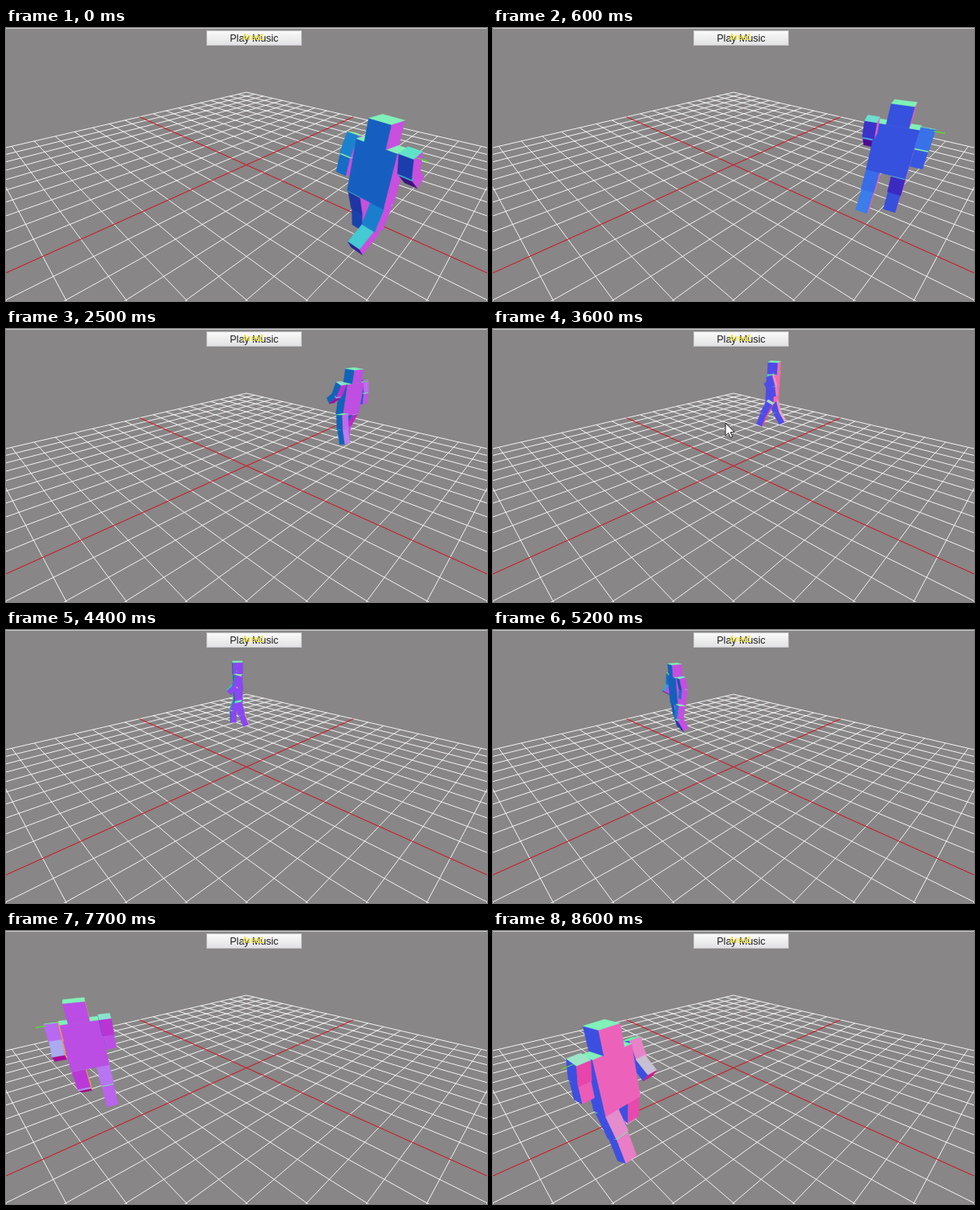
These frames come from a looping animation (600 by 340 pixels, 8700 ms). An HTML page with a canvas:

```html
<!DOCTYPE html>
<html lang="en">
<head>
<meta charset="utf-8">
<title>Walking figure</title>
<style>
  html, body { margin: 0; width: 100%; height: 100%; overflow: hidden; background: #888686; }
  canvas { position: absolute; left: 0; top: 0; }
  .button, .label { position: absolute; white-space: nowrap; text-align: center; }
  .button {
    left: 250px; top: 3px; width: 117px; height: 17px;
    border: 1px solid #c2c2c4;
    background: linear-gradient(#fafafa, #e2e2e4);
    font: 12.5px/18px "Liberation Sans", Arial, sans-serif; color: #1c1c1c;
  }
  .label {
    left: 288px; top: 6px; width: 41px;
    font: bold 10px/11px "Liberation Sans", Arial, sans-serif; color: #efe442;
  }
</style>
</head>
<body>
<canvas id="stage" width="600" height="340"></canvas>
<div class="button">Play Music</div>
<div class="label">Area1</div>
<script>
const ctx = document.getElementById('stage').getContext('2d');
const LOOP = 8700, STEP = 100;
const FOCAL = 370, CX = 300, CY = 170.5;
const SIN = 0.4483, COS = 0.8939;      // camera pitch
const HALF = 1.064, DIVISIONS = 20;    // half diagonal of the floor
const RADIUS = 0.452, STRIDE = 1900;
const RAD = Math.PI / 180, TAU = Math.PI * 2;

// u: right, v: away from the camera, h: up -> camera space
const rotate = (u, v, h) => [u, v * SIN + h * COS, v * COS - h * SIN];
const toCamera = (u, v, h) => {
  const p = rotate(u, v, h);
  p[2] += 1;
  return p;
};
const project = p => [CX + FOCAL * p[0] / p[2], CY - FOCAL * p[1] / p[2]];

function line(a, b, color, width) {
  ctx.strokeStyle = color;
  ctx.lineWidth = width;
  ctx.beginPath();
  ctx.moveTo(...project(a));
  ctx.lineTo(...project(b));
  ctx.stroke();
}

function drawFloor() {
  // a and b run along the floor's sides, from -1 to 1
  const floor = (a, b) => toCamera((a - b) * HALF / 2, (a + b) * HALF / 2, 0);
  const cross = (k, color) => {
    line(floor(k, -1), floor(k, 1), color, 1);
    line(floor(-1, k), floor(1, k), color, 1);
  };
  for (let i = 0; i <= DIVISIONS; i++) {
    if (i !== DIVISIONS / 2) cross(i * 2 / DIVISIONS - 1, 'rgba(255,255,255,0.9)');
  }
  cross(0, '#d40c1c');
}

// A box hanging from its pivot, swung forward by the given angle
function box(pivot, width, depth, length, angle) {
  return { pivot, width, depth, length, angle };
}

// Lower end of a swung box
function tip(b) {
  const [r, f, h] = b.pivot;
  return [r, f + b.length * Math.sin(b.angle), h - b.length * Math.cos(b.angle)];
}

function limb(pivot, width, lengths, angle, bend) {
  const upper = box(pivot, width, width, lengths[0], angle);
  const lower = box(tip(upper), width * 0.92, width * 0.92, lengths[1], angle + bend);
  return [upper, lower];
}

function bodyParts(time) {
  const parts = [
    box([0, 0, 0.232], 0.086, 0.036, 0.119, 0),
    box([0, 0, 0.280], 0.045, 0.043, 0.048, 0)
  ];
  for (const side of [-1, 1]) {
    // phase 0 is the moment this leg trails furthest behind
    const phase = TAU * ((time - 6500) / STRIDE + (side > 0 ? 0.5 : 0));
    const swing = -Math.cos(phase);
    const knee = -(8 + 42 * Math.max(0, Math.sin(phase + 0.35)));
    parts.push(...limb([side * 0.028, 0, 0.115], 0.030, [0.058, 0.057],
      (22 * swing + 4) * RAD, knee * RAD));
    parts.push(...limb([side * 0.0565, 0, 0.234], 0.027, [0.046, 0.040],
      -20 * swing * RAD, (22 - 12 * swing) * RAD));
  }
  return parts;
}

function drawFigure(time) {
  const turn = (-55.5 + 34.2 * time / 1000) * RAD;
  const c = Math.cos(turn), s = Math.sin(turn);
  const place = (r, f, h) => toCamera((RADIUS + r) * c - f * s, (RADIUS + r) * s + f * c, h);
  const direct = (r, f, h) => rotate(r * c - f * s, r * s + f * c, h);

  const boxes = bodyParts(time).map(b => {
    const ca = Math.cos(b.angle), sa = Math.sin(b.angle);
    const [r, f, h] = b.pivot;
    const center = place(r, f + sa * b.length / 2, h - ca * b.length / 2);
    const axes = [direct(1, 0, 0), direct(0, ca, sa), direct(0, -sa, ca)];
    return { center, axes, half: [b.width / 2, b.depth / 2, b.length / 2] };
  });
  boxes.sort((a, b) => Math.hypot(...b.center) - Math.hypot(...a.center));

  line(place(-0.068, 0, 0.229), place(0.088, 0, 0.229), '#66cf45', 1.2);
  boxes.forEach(drawBox);
  line(place(0.068, 0, 0.229), place(0.088, 0, 0.229), '#66cf45', 1.2);
}

function drawBox({ center, axes, half }) {
  const shift = (p, axis, k) => p.map((x, i) => x + axis[i] * k);
  for (let i = 0; i < 3; i++) {
    for (const sign of [-1, 1]) {
      const normal = axes[i].map(x => x * sign);
      const mid = shift(center, normal, half[i]);
      if (normal.reduce((sum, x, k) => sum + x * mid[k], 0) >= 0) continue;
      const j = (i + 1) % 3, k = (i + 2) % 3;
      const corners = [[-1, -1], [1, -1], [1, 1], [-1, 1]].map(([a, b]) =>
        project(shift(shift(mid, axes[j], a * half[j]), axes[k], b * half[k])));
      const [x, y, z] = normal;
      const color = [x, y, -z].map(n => Math.round(127.5 + 127.5 * n));
      polygon(corners, `rgb(${color})`);
    }
  }
}

function polygon(points, fill, stroke = fill, width = 0.4) {
  ctx.beginPath();
  points.forEach(p => ctx.lineTo(...p));
  ctx.closePath();
  ctx.fillStyle = fill;
  ctx.fill();
  ctx.strokeStyle = stroke;
  ctx.lineWidth = width;
  ctx.stroke();
}

function drawCursor(time) {
  if (time < 2800 || time > 4100) return;
  const k = 1 - Math.pow(1 - Math.min(1, (time - 2800) / 700), 3);
  const x = 175 + 115 * k, y = 203 - 86 * k;
  const arrow = [[0, 0], [0, 16], [3.6, 12.6], [6.2, 18.4], [8.8, 17.2], [6.3, 11.6], [11.2, 11.4]];
  polygon(arrow.map(([a, b]) => [x + a, y + b]), '#fff', '#222', 1);
}

function draw(now) {
  const time = Math.floor(now % LOOP / STEP) * STEP;
  ctx.fillStyle = '#888686';
  ctx.fillRect(0, 0, 600, 340);
  drawFloor();
  drawFigure(time);
  ctx.fillStyle = '#c9c8c9';
  ctx.fillRect(0, 0, 600, 1);
  drawCursor(time);
}

const start = performance.now();
function tick() {
  draw(performance.now() - start);
  requestAnimationFrame(tick);
}
tick();
</script>
</body>
</html>
```
